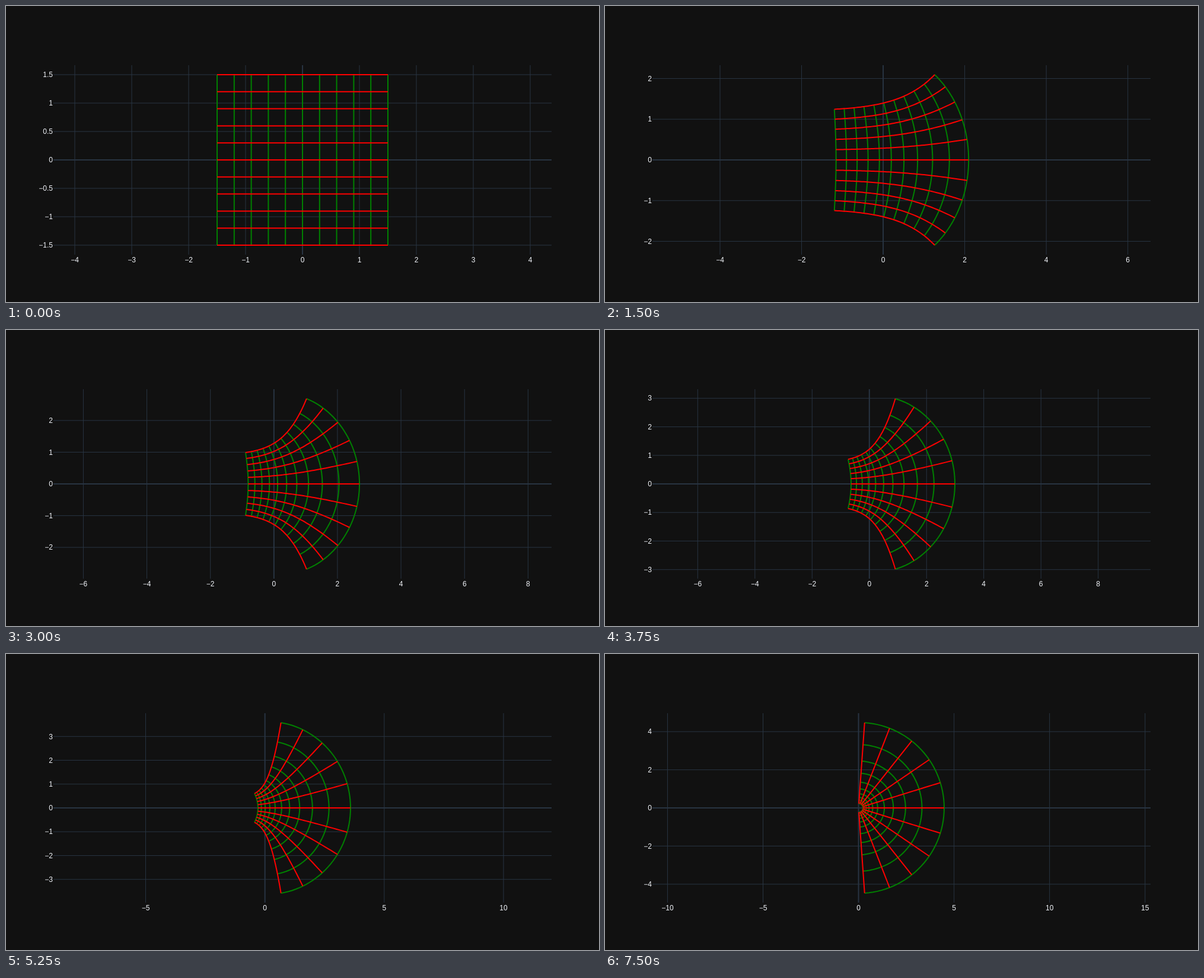
Write an HTML page that moves like this. It is 1000x500 px and loops after 8.25 s.

```html
<!DOCTYPE html>
<html lang="en">
<head>
<meta charset="utf-8">
<title>Grid under (1 − t)z + t·exp(z)</title>
<style>
  html, body { margin: 0; width: 100%; height: 100%; overflow: hidden; background: #111; }
  svg { display: block; width: 1000px; height: 500px; }
  path { fill: none; stroke-width: 2; stroke-miterlimit: 2; }
  .grid, .zero { stroke: #283442; }
  .grid { stroke-width: 1; }
  text { font: 12px "Liberation Sans", Arial, sans-serif; fill: #f2f5fa; text-anchor: middle; white-space: pre; }
  .y { text-anchor: end; }
</style>
</head>
<body>
<svg id="plot" viewBox="0 0 1000 500"></svg>
<script>
const STEP_MS = 750, STEPS = 11;
const HALF = 1.5, LINES = 10, SAMPLES = 60;
const LEFT = 80, RIGHT = 920, TOP = 100, BOTTOM = 420;
const CX = (LEFT + RIGHT) / 2, CY = (TOP + BOTTOM) / 2;
const DATA_HALF = 144;
const plot = document.getElementById('plot');

const spread = n => Array.from({ length: n + 1 }, (_, i) => HALF * (2 * i / n - 1));
const path = (kind, d) => `<path ${kind} d="${d}"/>`;
const label = v => String(+v.toFixed(1)).replace('-', '−');

// Blend of the identity and the complex exponential
const warp = (x, y, t) => [
  (1 - t) * x + t * Math.exp(x) * Math.cos(y),
  (1 - t) * y + t * Math.exp(x) * Math.sin(y)
];

function ticks(min, max, count) {
  const rough = (max - min) / count;
  const base = 10 ** Math.floor(Math.log10(rough));
  const step = base * [2, 5, 10].find(m => m >= rough / base);
  const list = [];
  for (let i = Math.ceil(min / step); i * step <= max; i++) list.push(i * step);
  return list;
}

function render(t) {
  const [xMin, yMax] = warp(-HALF, HALF, t).map((v, i) => i ? warp(HALF, HALF, t)[1] : v);
  const xMax = warp(HALF, 0, t)[0];
  const scale = DATA_HALF / yMax, mid = (xMin + xMax) / 2;
  const px = x => CX + (x - mid) * scale;
  const py = y => CY - y * scale;
  const halfW = (RIGHT - LEFT) / 2 / scale, halfH = (BOTTOM - TOP) / 2 / scale;

  const vertical = x => `M${px(x)} ${TOP}V${BOTTOM}`;
  const horizontal = y => `M${LEFT} ${py(y)}H${RIGHT}`;
  const xs = ticks(mid - halfW, mid + halfW, 10);
  const ys = ticks(-halfH, halfH, 9);
  const nonZero = v => Math.abs(v) > 1e-9;

  const curve = point => 'M' + spread(SAMPLES).map(s => {
    const [x, y] = warp(...point(s), t);
    return `${px(x).toFixed(2)} ${py(y).toFixed(2)}`;
  }).join('L');
  const family = (color, point) => spread(LINES)
    .map(c => path(`stroke="${color}"`, curve(s => point(c, s)))).join('');

  plot.innerHTML =
    xs.filter(nonZero).map(x => path('class="grid"', vertical(x))).join('') +
    ys.filter(nonZero).map(y => path('class="grid"', horizontal(y))).join('') +
    path('class="zero"', vertical(0)) +
    path('class="zero"', horizontal(0)) +
    family('green', (c, s) => [c, s]) +
    family('red', (c, s) => [s, c]) +
    xs.map(x => `<text x="${px(x)}" y="433">${label(x)}</text>`).join('') +
    ys.map(y => `<text class="y" x="79" y="${py(y) + 4.2}">${label(y)}</text>`).join('');
}

let shown = -1;
function tick() {
  const step = Math.floor(performance.now() / STEP_MS) % STEPS;
  if (step !== shown) {
    shown = step;
    render(step / (STEPS - 1));
  }
  requestAnimationFrame(tick);
}
tick();
</script>
</body>
</html>
```
